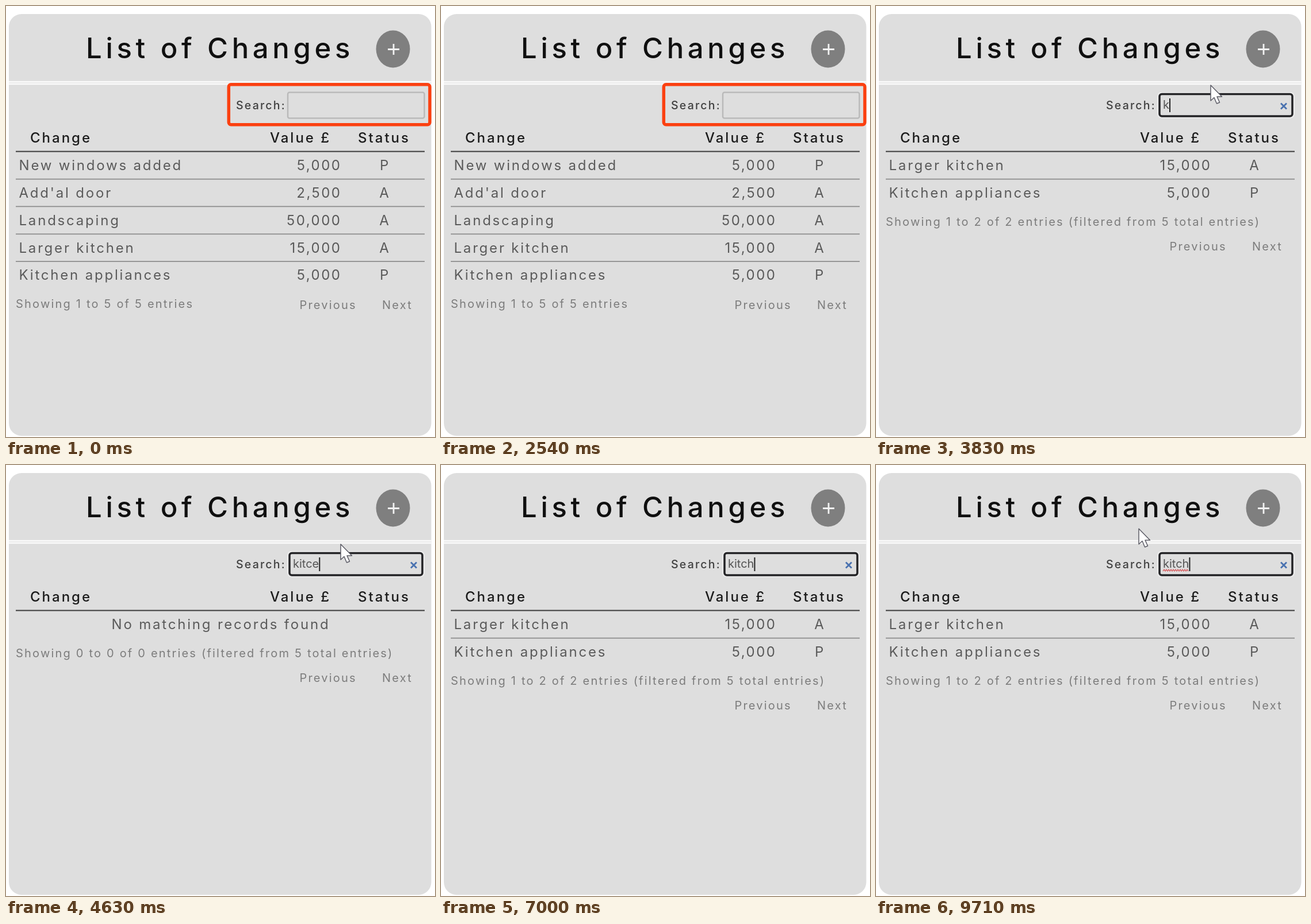
An HTML page for the animation above (9.88 s loop, 746 by 751 pixels).

```html
<!DOCTYPE html>
<html lang="en">
<head>
<meta charset="utf-8">
<title>List of Changes</title>
<style>
  html, body { margin: 0; width: 100%; height: 100%; overflow: hidden; background: #fff; }
  svg { display: block; width: 100%; height: 100%; }
  text { font-family: Inter, "Open Sans", sans-serif; white-space: pre; }
  .title { font-size: 49px; font-weight: 500; letter-spacing: 6.7px; fill: #101010; }
  .head { font-size: 24px; font-weight: 500; letter-spacing: 3px; fill: #1c1c1c; }
  .cell { font-size: 24px; letter-spacing: 2.8px; fill: #5a5a5a; }
  .num { letter-spacing: 2.5px; text-anchor: end; }
  .mid { text-anchor: middle; }
  .foot { font-size: 20px; letter-spacing: 2.2px; fill: #7c7c7c; }
  .label { font-size: 19.5px; font-weight: 500; letter-spacing: 2.2px; fill: #404040; }
  .query { font-size: 20px; fill: #555; }
  .rule { stroke: #8c8c8c; stroke-width: 1.7; }
</style>
</head>
<body>
<svg viewBox="0 0 746 751">
  <rect x="5" y="14" width="734.5" height="735" rx="22" fill="#dedede"/>
  <rect x="5" y="130.5" width="734.5" height="7" fill="#ebebeb"/>
  <path d="M5 132H739.5M5 136H739.5" stroke="#fafafa" stroke-width="2"/>

  <text class="title" x="139" y="91">List of Changes</text>
  <ellipse cx="673" cy="75" rx="29.5" ry="32.5" fill="#7f7f7f"/>
  <path d="M664 75.5H684M674 66V85" stroke="#f2f2f2" stroke-width="2.8"/>

  <text class="label" x="400" y="180">Search:</text>
  <g id="idle">
    <rect x="490" y="150.5" width="237.5" height="45" rx="3" fill="none" stroke="#bababa" stroke-width="2.5"/>
    <rect x="387.3" y="136.8" width="349.7" height="70" rx="4" fill="none" stroke="#fb4010" stroke-width="5.5"/>
  </g>
  <g id="focus">
    <rect x="490" y="151" width="237" height="43.5" rx="6" fill="none" stroke="#ececec" stroke-width="2"/>
    <rect x="493" y="153.5" width="231" height="38.5" rx="4" fill="#dedede" stroke="#232326" stroke-width="3.5"/>
  </g>
  <text class="query" id="query" x="499" y="179"></text>
  <path id="squiggle" fill="none" stroke="#d86a6c" stroke-width="1.4"/>
  <path id="caret" stroke="#222" stroke-width="2"/>
  <path id="clear" d="M704 169.5L714 179.5M714 169.5L704 179.5" stroke="#4a72b0" stroke-width="2.8"/>

  <text class="head" x="42" y="238">Change</text>
  <text class="head" x="459" y="238">Value £</text>
  <text class="head" x="612" y="238">Status</text>
  <path d="M17 253.5H728" stroke="#3c3c3c" stroke-width="2"/>
  <g id="table"></g>

  <path id="pointer" d="M0 0V27L6 21.5L10.5 32L15.5 30L11 20H19.5Z" fill="#fff" stroke="#5c5c66" stroke-width="1.5" stroke-linejoin="round"/>
</svg>
<script>
const LOOP = 9880;
const ROW = 47.85;
const rows = [
  ["New windows added", "5,000", "P"],
  ["Add'al door", "2,500", "A"],
  ["Landscaping", "50,000", "A"],
  ["Larger kitchen", "15,000", "A"],
  ["Kitchen appliances", "5,000", "P"]
];

// Each track is a list of [start time, value]; the value holds until the next entry.
const typing = [[0, ""], [3670, "k"], [4000, "ki"], [4150, "kit"], [4290, "kitc"],
  [4630, "kitce"], [5080, "kitc"], [5880, "kitch"]];
const caretOn = [[0, false], [2880, true], [3330, false], [3670, true], [5580, false],
  [5880, true], [6540, false], [7000, true], [7630, false], [8290, true], [8750, false], [9250, true]];
const pointerAt = [[0, null], [3170, [582, 138]], [5250, null], [8450, [470, 150]], [8600, [458, 128]],
  [8750, [452, 118]], [9250, [441, 96]], [9400, [436, 89]], [9550, [448, 102]], [9710, [457, 111]]];

const el = id => document.getElementById(id);
const show = (id, on) => el(id).setAttribute("visibility", on ? "visible" : "hidden");
const at = (track, t) => track.reduce((v, [start, value]) => t >= start ? value : v, null);
const text = (cls, x, y, s) => `<text class="${cls}" x="${x}" y="${y}">${s}</text>`;

function table(query) {
  const found = rows.filter(r => r[0].toLowerCase().includes(query));
  const n = found.length;
  let out = n ? "" : text("cell mid", 373.5, 286, "No matching records found");
  found.forEach(([name, value, status], i) => {
    const y = 286 + i * ROW;
    out += text("cell", 22.5, y, name) + text("cell num", 583.5, y, value) + text("cell mid", 659, y, status);
    if (i) out += `<path class="rule" d="M17 ${y + 15.6 - ROW}H728"/>`;
  });
  const base = 286 + Math.max(n, 1) * ROW;
  const pageY = query ? base + 44.3 : base + 3;
  const filtered = query ? ` (filtered from ${rows.length} total entries)` : "";
  return out
    + text("foot", 17, base + 1, `Showing ${n ? 1 : 0} to ${n} of ${n} entries${filtered}`)
    + text("foot", 510.5, pageY, "Previous") + text("foot", 654, pageY, "Next");
}

let lastQuery = null;
function draw(t) {
  const query = at(typing, t);
  if (query !== lastQuery) {
    lastQuery = query;
    el("query").textContent = query;
    el("table").innerHTML = table(query);
    const width = query ? el("query").getComputedTextLength() : 0;
    el("caret").setAttribute("d", `M${500 + width} 161V185`);
    let zig = "M499 185";
    for (let x = 2; x <= width; x += 2) zig += `L${499 + x} ${x % 4 ? 182 : 185}`;
    el("squiggle").setAttribute("d", zig);
  }
  show("idle", t < 2880);
  show("focus", t >= 2880);
  show("clear", query);
  show("squiggle", t >= 7170);
  show("caret", at(caretOn, t));
  const p = at(pointerAt, t);
  show("pointer", p);
  if (p) el("pointer").setAttribute("transform", `translate(${p})`);
}

const begin = performance.now();
function tick() {
  draw((performance.now() - begin) % LOOP);
  requestAnimationFrame(tick);
}
tick();
</script>
</body>
</html>
```
